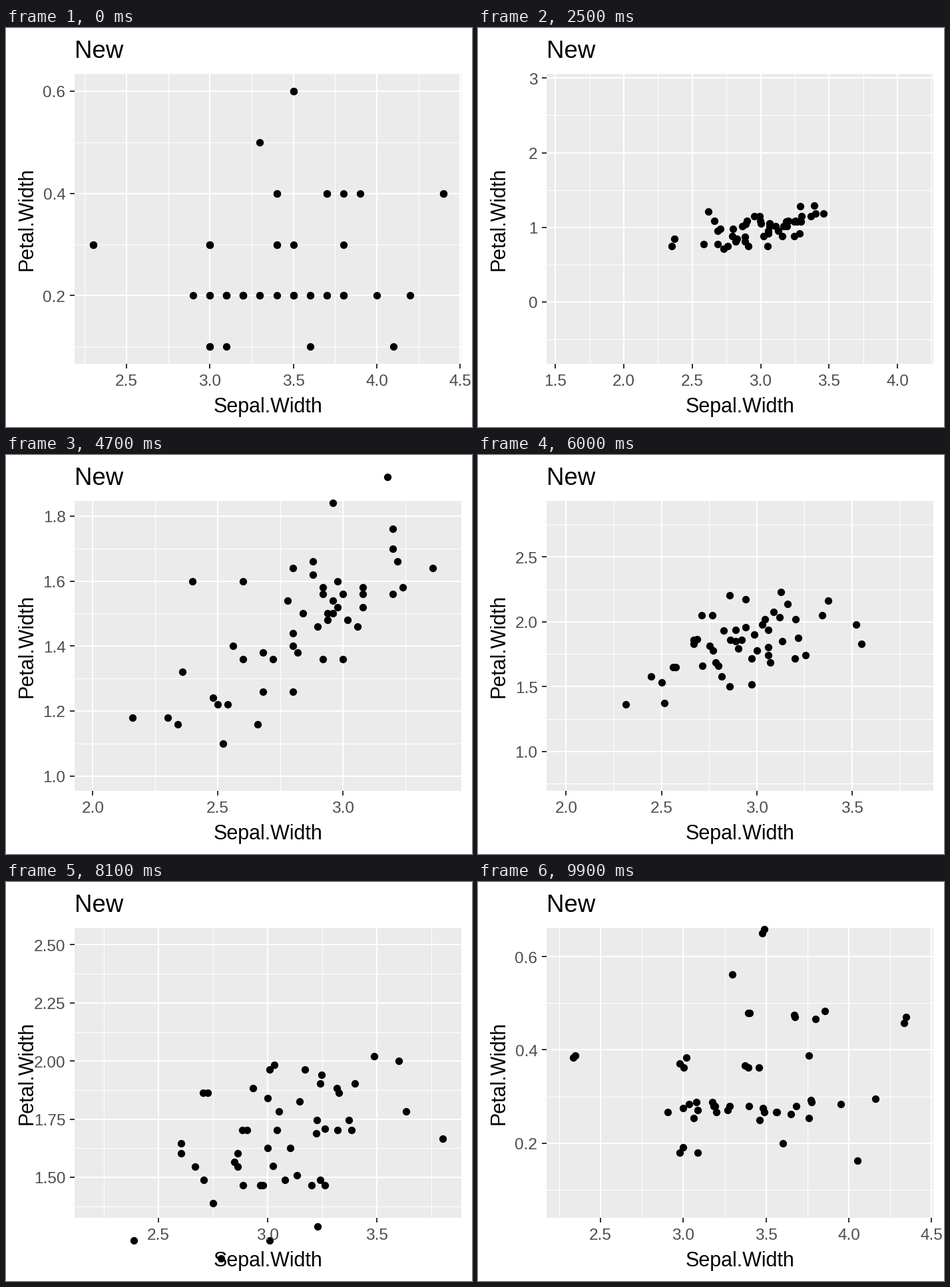
These frames come from a looping animation (700x600 px, 10 s). A matplotlib script:

```python
import itertools
import math

import matplotlib.pyplot as plt
import numpy as np
from matplotlib.animation import FuncAnimation
from matplotlib.patches import Rectangle

plt.rcParams["font.family"] = "Liberation Sans"

DPI, WIDTH, HEIGHT = 200, 700, 600
PX = 72 / DPI
LEFT, RIGHT, TOP, BOTTOM = 103, 684, 69, 505
FRAMES, INTERVAL, FLOWERS = 100, 100, 50
POINT_SPANS = [(8, 33), (42, 67), (76, 100)]
VIEW_SPANS = [(12, 34), (46, 68), (80, 101)]

# Lowest petal width, then the sepal widths found at each further 0.1.
GROUPS = [
    (0.1, [[3.0, 3.1, 3.6, 4.1],
           [2.9, 3.0, 3.1, 3.2, 3.3, 3.4, 3.5, 3.6, 3.7, 3.8, 4.0, 4.2],
           [2.3, 3.0, 3.4, 3.5, 3.8], [3.4, 3.7, 3.8, 3.9, 4.4], [3.3], [3.5]]),
    (1.0, [[2.0, 2.2, 2.3, 2.4, 2.6, 2.7], [2.4, 2.5], [2.6, 2.7, 2.8, 3.0],
           [2.3, 2.5, 2.7, 2.8, 2.9, 3.0], [2.7, 2.8, 2.9, 3.0, 3.1, 3.2],
           [2.2, 2.5, 2.8, 2.9, 3.0, 3.1, 3.2], [2.7, 3.3, 3.4], [3.0], [3.2]]),
    (1.4, [[2.6], [2.2, 2.8], [3.0], [2.5], [2.5, 2.7, 2.8, 2.9, 3.0, 3.1, 3.2],
           [2.5, 2.7, 2.8], [2.5, 2.8, 3.0, 3.2, 3.8], [2.8, 3.0, 3.1, 3.3],
           [2.8, 3.0, 3.8], [2.6, 3.0, 3.1, 3.2, 3.4], [2.8, 3.1, 3.4], [3.3, 3.6]]),
]


def flowers(lowest, rows, rng):
    """Every distinct point, topped up with repeats from the fuller rows."""
    points = np.array([(x, lowest + 0.1 * i) for i, row in enumerate(rows) for x in row])
    weights = np.array([len(row) for row in rows for _ in row], float)
    repeats = rng.choice(len(points), FLOWERS - len(points), p=weights / weights.sum())
    return rng.permutation(np.vstack([points, points[repeats]]))


rng = np.random.default_rng(7)
STATES = [flowers(lowest, rows, rng) for lowest, rows in GROUPS]


def stage(frame, spans):
    """Index of the current state and the progress towards the next one."""
    i = sum(frame >= start for start, _ in spans) - 1
    if i < 0:
        return 0, 0.0
    start, end = spans[i]
    return i, min(1.0, (frame - start) / (end - start))


def zoom(a, b, p):
    """Smooth zoom-and-pan between two value ranges, with 5% padding."""
    k = math.e ** 2
    w0, w1 = np.ptp(a), np.ptp(b)
    c0, c1 = (a.min() + a.max()) / 2, (b.min() + b.max()) / 2
    kd = k * abs(c1 - c0)
    growth = w1 ** 2 - w0 ** 2
    r0 = -math.asinh((growth + kd ** 2) / (2 * w0 * kd))
    r1 = -math.asinh((growth - kd ** 2) / (2 * w1 * kd))
    r = r0 + p * (r1 - r0)
    width = w0 * math.cosh(r0) / math.cosh(r)
    shift = w0 / k * (math.cosh(r0) * math.tanh(r) - math.sinh(r0))
    center = c0 + math.copysign(shift, c1 - c0)
    return center - 0.55 * width, center + 0.55 * width


def nice_breaks(lo, hi, wanted=5):
    """Extended Wilkinson labelling; returns the first break, step and count."""
    steps = [1, 5, 2, 2.5, 4, 3]
    best, result = -math.inf, None
    for j, (rank, q), k in itertools.product((1, 2), enumerate(steps), range(2, 11)):
        power = math.ceil(math.log10((hi - lo) / (k + 1) / j / q))
        for z in (power, power + 1):
            step = j * q * 10.0 ** z
            first = math.floor(hi / step) * j - (k - 1) * j
            last = math.ceil(lo / step) * j
            for start in range(first, last + 1):
                bottom = start * step / j
                top = bottom + step * (k - 1)
                has_zero = start % j == 0 and bottom <= 0 <= top
                simplicity = 1 - rank / (len(steps) - 1) - j + has_zero
                miss = (hi - top) ** 2 + (lo - bottom) ** 2
                coverage = 1 - 0.5 * miss / (0.1 * (hi - lo)) ** 2
                ratio = ((k - 1) / (top - bottom)
                         * (max(top, hi) - min(bottom, lo)) / (wanted - 1))
                density = 2 - max(ratio, 1 / ratio)
                score = 0.25 * simplicity + 0.2 * coverage + 0.5 * density
                if score > best + 1e-12:
                    best, result = score, (bottom, step, k)
    return result


def axis_marks(lo, hi):
    """Major breaks, minor breaks and labels that lie inside the range."""
    first, step, count = nice_breaks(lo, hi)
    major = first + step * np.arange(count)
    minor = first + step * (np.arange(count + 1) - 0.5)
    major, minor = (v[(v >= lo) & (v <= hi)] for v in (major, minor))
    digits = next(d for d in range(6) if np.allclose(major, np.round(major, d), atol=1e-9))
    return major, minor, [f"{v + 0.0:.{digits}f}" if abs(v) > 1e-9 else f"{0:.{digits}f}"
                          for v in major]


fig = plt.figure(figsize=(WIDTH / DPI, HEIGHT / DPI), dpi=DPI, facecolor="white")
ax = fig.add_axes([0, 0, 1, 1])


def line(xs, ys, color, width):
    ax.plot(xs, ys, color=color, lw=width * PX, solid_capstyle="butt", antialiased=False)


def text(x, y, s, size, color="black", ha="center", rotation=0):
    ax.text(x, y, s, fontsize=size, color=color, ha=ha, va="baseline",
            rotation=rotation, rotation_mode="anchor")


def draw(frame):
    frame = frame or FRAMES  # the loop opens on the end of the last move
    ax.cla()
    ax.set(xlim=(0, WIDTH), ylim=(HEIGHT, 0))
    ax.axis("off")

    i, t = stage(frame, VIEW_SPANS)
    a, b = STATES[i], STATES[(i + 1) % 3]
    eased = math.sin(math.pi * t / 2) ** 2
    (x0, x1), (y0, y1) = (zoom(a[:, d], b[:, d], eased) for d in (0, 1))

    def to_x(v):
        return LEFT + (v - x0) / (x1 - x0) * (RIGHT - LEFT)

    def to_y(v):
        return BOTTOM - (v - y0) / (y1 - y0) * (BOTTOM - TOP)

    ax.add_patch(Rectangle((LEFT, TOP), RIGHT - LEFT, BOTTOM - TOP, fc="#EBEBEB", lw=0))
    x_major, x_minor, x_labels = axis_marks(x0, x1)
    y_major, y_minor, y_labels = axis_marks(y0, y1)
    for xs, ys, width in ((x_minor, y_minor, 1), (x_major, y_major, 2)):
        for y in to_y(ys):
            line([LEFT, RIGHT], [y, y], "white", width)
        for x in to_x(xs):
            line([x, x], [TOP, BOTTOM], "white", width)

    i, t = stage(frame, POINT_SPANS)
    points = STATES[i] + t * (STATES[(i + 1) % 3] - STATES[i])
    ax.plot(to_x(points[:, 0]), to_y(points[:, 1]), "o", color="black",
            ms=11.3 * PX, mew=0, antialiased=False)

    for x, label in zip(to_x(x_major), x_labels):
        line([x, x], [BOTTOM, BOTTOM + 7], "#333333", 2)
        text(x, 538, label, 8.8, "#4D4D4D")
    for y, label in zip(to_y(y_major), y_labels):
        line([LEFT - 7, LEFT], [y, y], "#333333", 2)
        text(89.5, y + 9.5, label, 8.8, "#4D4D4D", ha="right")

    text(393.5, 578, "Sepal.Width", 11)
    text(40, 287, "Petal.Width", 11, rotation=90)
    text(103, 45, "New", 13.2, ha="left")
    return []


anim = FuncAnimation(fig, draw, frames=FRAMES, interval=INTERVAL,
                     init_func=lambda: [], repeat=True, repeat_delay=0)
plt.show()
```
